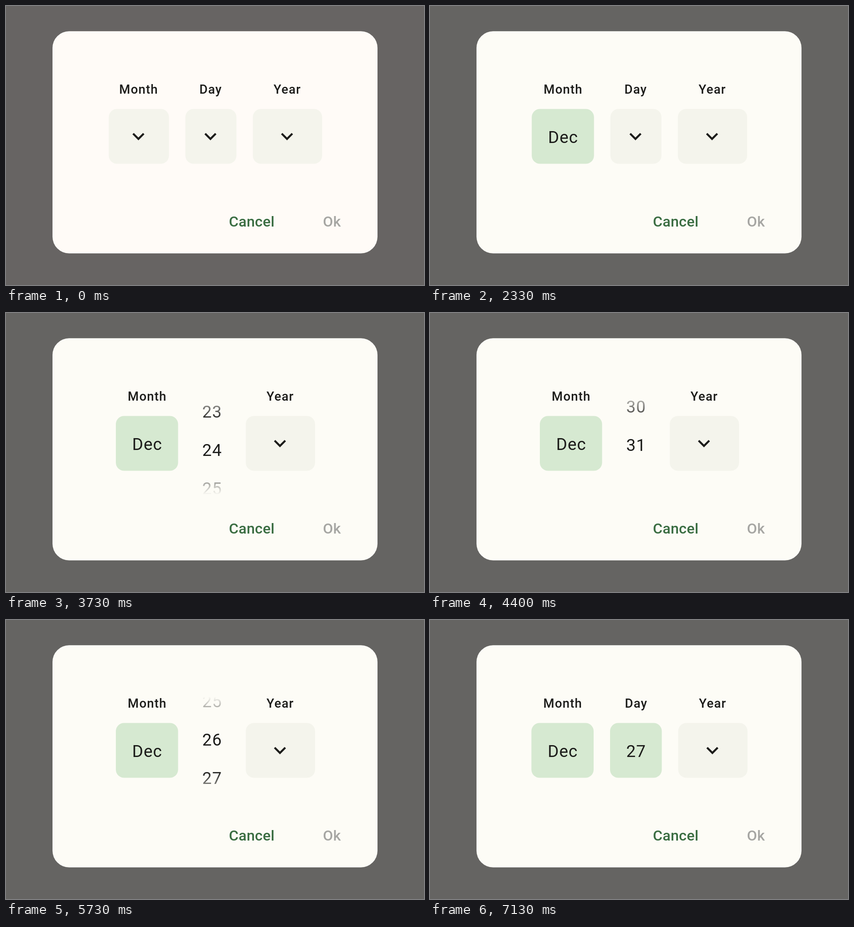
These frames come from a looping animation (917x611 px, 8000 ms). An HTML page with a canvas:

```html
<!DOCTYPE html>
<html lang="en">
<head>
<meta charset="utf-8">
<title>Date picker</title>
<style>
html, body { margin: 0; width: 100%; height: 100%; overflow: hidden; background: #656462; }
canvas { display: block; }
</style>
</head>
<body>
<canvas id="stage" width="917" height="611"></canvas>
<script>
const ctx = document.getElementById('stage').getContext('2d');
const LOOP = 8000, TICK = 200 / 3;
const INK = '#1c1c1a', FONT = 'Roboto, sans-serif';
const CENTER = 459.5, GAP = 36, PITCH = 84, WHEEL_Y = 283;
const MONTHS = 'Jan Feb Mar Apr May Jun Jul Aug Sep Oct Nov Dec'.split(' ');
const DAYS = Array.from({ length: 31 }, (_, i) => String(i + 1));

const COLUMNS = [
  { label: 'Month', value: 'Dec', items: MONTHS, width: { empty: 132, wheel: 96, filled: 136.5 } },
  { label: 'Day', value: '27', items: DAYS, width: { empty: 112, wheel: 76.5, filled: 113.5 } },
  { label: 'Year', width: { empty: 152 } }
];

// Wheel moves: start tick, end tick, first item, last item, easing bias
const SPINS = [
  [[15, 19, 1, 12, 1]],
  [
    [43, 61, 1, 31, 1.18],
    [65, 76, 31, 27.89, 1],
    [76, 78, 27.89, 28, 1],
    [79, 89, 28, 26, 0.7],
    [91, 101, 26, 26.97, 1],
    [103, 104, 26.97, 27, 1]
  ]
];

const clamp = x => Math.min(1, Math.max(0, x));
const smooth = x => x * x * (3 - 2 * x);

function wheelPos(spins, tick) {
  let pos = spins[0][2];
  for (const [start, end, from, to, bias] of spins) {
    if (tick < start) break;
    const p = clamp((tick - start) / (end - start));
    pos = from + (to - from) * smooth(p ** bias);
  }
  return pos;
}

function states(tick) {
  const month = tick < 6 ? 'empty' : tick < 28 ? 'wheel' : 'filled';
  const day = tick < 43 ? 'empty' : tick < 107 ? 'wheel' : 'filled';
  return [month, day, 'empty'];
}

function text(str, x, y, size, weight, spacing, fill) {
  ctx.font = `${weight} ${size}px ${FONT}`;
  ctx.letterSpacing = spacing + 'px';
  ctx.fillStyle = fill;
  ctx.fillText(str, x + spacing / 2, y);
}

const valueText = (str, x, mid, fill) => text(str, x, mid + 13, 36.8, 400, 1.15, fill);

function roundBox(x, y, w, h, r, fill) {
  ctx.fillStyle = fill;
  ctx.beginPath();
  ctx.roundRect(x, y, w, h, r);
  ctx.fill();
}

function chevron(x) {
  const s = 2.2, y = 277.9;
  const points = [[4.59, 0], [0, 4.58], [-4.59, 0], [-6, 1.41], [0, 7.41], [6, 1.41]];
  ctx.fillStyle = INK;
  ctx.beginPath();
  for (const [px, py] of points) ctx.lineTo(x + px * s, y + py * s);
  ctx.fill();
}

function wheelFade() {
  const g = ctx.createLinearGradient(0, WHEEL_Y - 115, 0, WHEEL_Y + 115);
  g.addColorStop(0, 'rgba(28,28,26,0)');
  g.addColorStop(0.29, INK);
  g.addColorStop(0.71, INK);
  g.addColorStop(1, 'rgba(28,28,26,0)');
  return g;
}
const FADE = wheelFade();

function wheel(items, pos, x) {
  items.forEach((item, i) => {
    const y = WHEEL_Y + (i + 1 - pos) * PITCH;
    if (Math.abs(y - WHEEL_Y) < 135) valueText(item, x, y, FADE);
  });
}

function mix(a, b, p) {
  return `rgb(${a.map((v, i) => Math.round(v + (b[i] - v) * p))})`;
}

function draw(ms) {
  const tick = Math.floor((ms + 3.4) / TICK) % 120;
  const tint = clamp(tick / 6);
  ctx.textAlign = 'center';
  ctx.fillStyle = mix([103, 100, 99], [101, 100, 98], tint);
  ctx.fillRect(0, 0, 917, 611);
  roundBox(102, 55.3, 713, 486.4, 36.5, mix([255, 251, 247], [253, 252, 246], tint));

  const modes = states(tick);
  const widths = COLUMNS.map((c, i) => c.width[modes[i]]);
  let x = CENTER - (widths.reduce((a, b) => a + b) + 2 * GAP) / 2;

  COLUMNS.forEach((col, i) => {
    const mode = modes[i], w = widths[i];
    const mid = x + w / 2 - (mode === 'empty' ? 1 : 0);
    if (mode === 'wheel') {
      wheel(col.items, wheelPos(SPINS[i], tick), mid);
    } else {
      roundBox(x, 225.5, w, 120, 18, mode === 'filled' ? '#d6e9d1' : '#f4f4ec');
      text(col.label, mid, 191.5, 27.6, 500, 1.15, INK);
      if (mode === 'filled') valueText(col.value, mid, 287, INK);
      else chevron(mid);
    }
    x += w + GAP;
  });

  text('Cancel', 539, 482.6, 32.2, 500, 0.23, '#3a6d42');
  text('Ok', 715, 482.6, 32.2, 500, 0.23, '#a6a6a3');
}

const began = performance.now();
function loop() {
  draw((performance.now() - began) % LOOP);
  requestAnimationFrame(loop);
}
loop();
</script>
</body>
</html>
```
